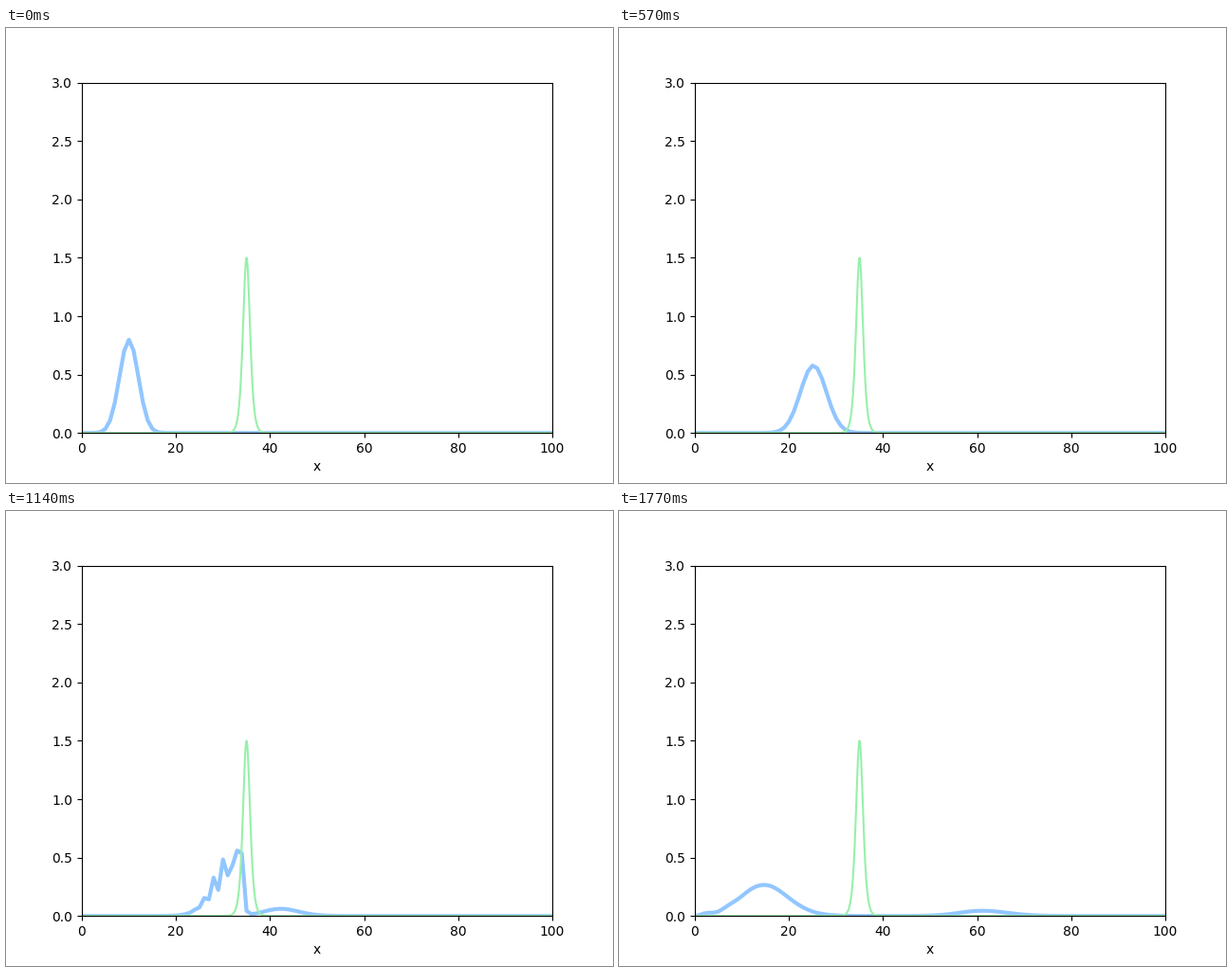
Recreate the animation shown at these times as a matplotlib script. Size 640 px wide and 480 px high, loop 1800 ms.

```python
import numpy as np
import matplotlib.pyplot as plt
from matplotlib.animation import FuncAnimation

FRAMES, INTERVAL = 60, 30
LENGTH, CELLS = 100, 400          # box size and number of grid cells
MASS, K0, X0, SIGMA = 2.0, 2.0, 10.0, 2.0
STEP = 0.8                        # simulated time per frame (hbar = 1)


def barrier(x):
    return 1.5 / np.cosh(np.clip(x - 35, -40, 40)) ** 2


# Hamiltonian of a particle in a box, built from its sine modes
x = np.linspace(0, LENGTH, CELLS + 1)
inner = x[1:-1]
n = np.arange(1, CELLS)
modes = np.sqrt(2 / CELLS) * np.sin(np.pi * np.outer(n, n) / CELLS)
kinetic = (np.pi * n / LENGTH) ** 2 / (2 * MASS)
hamiltonian = (modes * kinetic) @ modes + np.diag(barrier(inner))
energy, states = np.linalg.eigh(hamiltonian)

# Gaussian wave packet expanded in the eigenstates
packet = (2 / np.pi) ** 0.25 * np.exp(
    -((inner - X0) / (2 * SIGMA)) ** 2 + 1j * K0 * inner)
coeffs = states.T @ packet


def density(t):
    psi = np.zeros(CELLS + 1, complex)
    psi[1:-1] = states @ (coeffs * np.exp(-1j * energy * t))
    return np.abs(psi) ** 2


fig, ax = plt.subplots(figsize=(6.4, 4.8), dpi=100)
ax.set(xlim=(0, LENGTH), ylim=(0, 3), xlabel="x")

every = CELLS // LENGTH           # show the wave at whole x only
wave, = ax.plot(x[::every], density(0)[::every], color="#92C6FF", lw=3)
fine = np.linspace(0, LENGTH, 1001)
ax.plot(fine, barrier(fine), color="#97F0AA", lw=1.5)


def update(i):
    wave.set_ydata(density(i * STEP)[::every])
    return wave,


anim = FuncAnimation(fig, update, frames=FRAMES, interval=INTERVAL,
                     repeat=True, repeat_delay=0)
plt.show()
```
